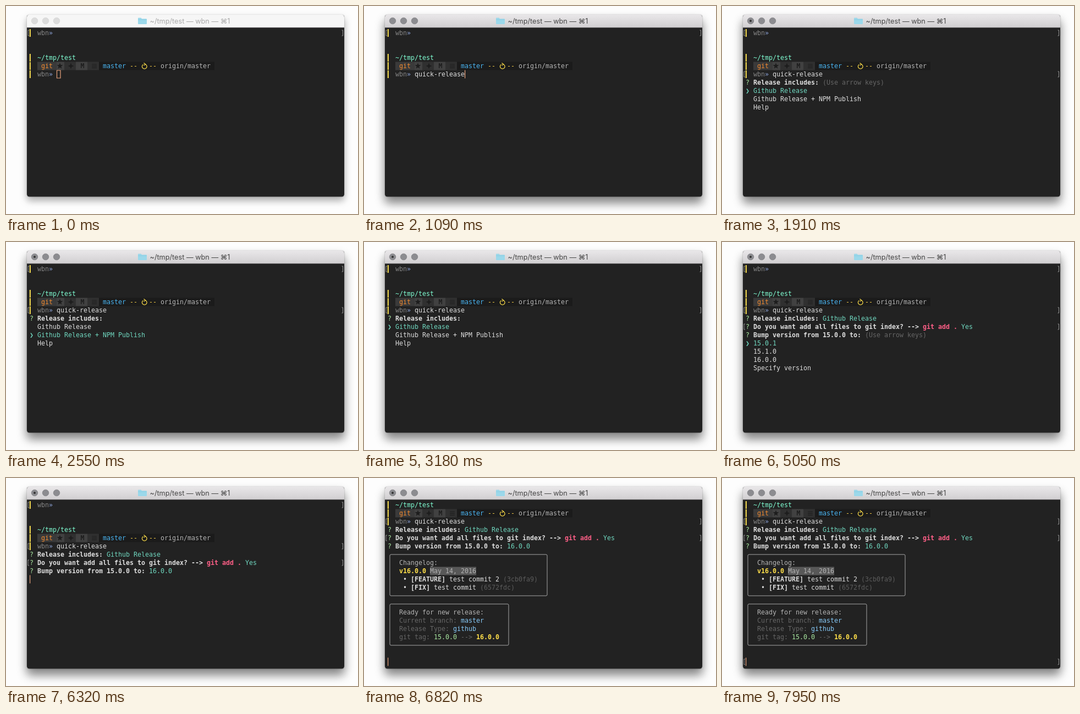
An HTML page that plays this animation: 640 px wide and 378 px high, repeating every 8000 ms.

```html
<!DOCTYPE html>
<html lang="en">
<head>
<meta charset="utf-8">
<title>Terminal</title>
<style>
  html, body { margin: 0; width: 100%; height: 100%; overflow: hidden; background: #fdfdfd; }
  svg { display: block; width: 100vw; height: 100vh; }
  #screen text { font: 11.63px "DejaVu Sans Mono", monospace; white-space: pre; }
  #screen .b { font-weight: bold; }
  #title { font: 12.7px Inter, "DejaVu Sans", sans-serif; text-anchor: middle; }
  .active #frame { filter: drop-shadow(0 11px 9px rgba(0, 0, 0, .42)) drop-shadow(0 0 1px rgba(0, 0, 0, .3)); }
  .idle #frame { filter: drop-shadow(0 7px 7px rgba(0, 0, 0, .28)) drop-shadow(0 0 1px rgba(0, 0, 0, .25)); }
  .active #bar { fill: url(#chrome); }
  .idle #bar { fill: #f6f6f6; }
  .active #lights { fill: #8c8c90; stroke: #77777b; }
  .idle #lights { fill: #dcdcdc; stroke: #d0d0d0; }
  .active #title { fill: #464646; }
  .idle #title { fill: #a9a9a9; }
</style>
</head>
<body>
<svg id="stage" class="idle" viewBox="0 0 640 378">
  <defs>
    <linearGradient id="chrome" x2="0" y2="1">
      <stop stop-color="#e9e7e9"/><stop offset="1" stop-color="#d1cfd1"/>
    </linearGradient>
    <clipPath id="view"><rect x="38" y="40" width="577" height="306"/></clipPath>
  </defs>
  <rect id="frame" x="38" y="16" width="577" height="330.5" rx="4.5" fill="#222"/>
  <path id="bar" d="M38 39V20.5a5 5 0 0 1 5-5H610a5 5 0 0 1 5 5V39z"/>
  <path d="M38 39H615" stroke="#aaa8aa" stroke-width=".8"/>
  <g id="lights" stroke-width=".6">
    <circle cx="52" cy="27" r="5.8"/><circle cx="72" cy="27" r="5.8"/><circle cx="92" cy="27" r="5.8"/>
  </g>
  <circle id="dot" cx="52" cy="27" r="2" fill="#333"/>
  <path d="M240 22.5q0-1 1-1h4.5l1.5 1.7h8q1 0 1 1V32q0 1-1 1H241q-1 0-1-1z" fill="#9bd8ea"/>
  <path d="M240 25H256" stroke="#83c7dd" stroke-width=".7"/>
  <text id="title" x="334.5" y="32">~/tmp/test — wbn — ⌘1</text>
  <g clip-path="url(#view)"><g id="screen"></g></g>
</svg>
<script>
const LOOP = 8000, CELL = 7, LINE = 15, LEFT = 43, TOP = 49;
const COMMAND = "quick-release", USER = "wbn";
const $ = id => document.getElementById(id);

const color = {
  gray: "#858585", dim: "#666", faint: "#5c5c5c", soft: "#b4b4b4", white: "#dedede",
  teal: "#70d8c0", mint: "#80ffd4", green: "#a9e8a0", blue: "#86c9f7", sky: "#4ab5f2",
  yellow: "#ffe04a", gold: "#eec544", orange: "#f08a30", pink: "#ff5f87", arrow: "#8fa6dc",
  cursor: "#eaa27c"
};

// Times of the key presses and of the output that follows them
const at = {
  focus: 340, type: 560, typed: 1040, run: 1240, menu: 1580,
  picked: 3230, ask: 3310, yes: 4300, bump: 4400,
  chosen: 6060, report: 6500, confirm: 7600
};
const releaseMoves = [[2180, 1], [2620, 2], [2860, 1], [3060, 0]];
const bumpMoves = [[5330, 1], [5640, 2]];

const colX = c => LEFT + c * CELL;
const rowY = r => TOP + r * LINE;
const esc = s => s.replace(/&/g, "&amp;").replace(/</g, "&lt;").replace(/>/g, "&gt;");

const rect = (x, y, w, h, fill) =>
  `<rect x="${x}" y="${y}" width="${w}" height="${h}" fill="${fill}"/>`;
const path = (d, stroke, width = 1) =>
  `<path d="${d}" fill="none" stroke="${stroke}" stroke-width="${width}"/>`;

// Spans are [text, colour name, bold], laid out on the character grid
function write(row, col, ...spans) {
  let out = "";
  for (const [text, name, bold] of spans) {
    out += `<text x="${colX(col)}" y="${rowY(row) + 4}" fill="${color[name]}"` +
      `${bold ? ' class="b"' : ""}>${esc(text)}</text>`;
    col += text.length;
  }
  return out;
}

const block = (row, col, cells, fill) => rect(colX(col), rowY(row) - 7.5, cells * CELL, LINE, fill);
const gutter = row => rect(42.8, rowY(row) - 7, 2.1, 14, "#f5dc50");
const caret = (row, col) => rect(colX(col), rowY(row) - 7.5, 1.2, 15, color.cursor);

function mark(row) {
  const y = rowY(row) - 5;
  return path(`M42 ${y}h-2v10h2M610.5 ${y}h2v10h-2`, "#a0a0a0", .9);
}

function prompt(row, command = "") {
  return gutter(row) + write(row, 2, [USER, "gray"], ["» ", "arrow"], [command, "white"]);
}

function star(cx, cy, points, outer, inner) {
  const pts = Array.from({ length: points * 2 }, (_, i) => {
    const a = i * Math.PI / points - Math.PI / 2, r = i % 2 ? inner : outer;
    return `${(cx + r * Math.cos(a)).toFixed(1)},${(cy + r * Math.sin(a)).toFixed(1)}`;
  });
  return `<polygon points="${pts.join(" ")}" fill="#1d1d1d"/>`;
}

function gitLine(row) {
  const y = rowY(row);
  return gutter(row) +
    block(row, 2, 5, "#3a3a3a") + block(row, 7, 2, "#414141") + block(row, 9, 3, "#303030") +
    block(row, 12, 3, "#414141") + block(row, 15, 3, "#303030") + block(row, 18, 30, "#1b1b1b") +
    write(row, 3, ["git", "orange"]) +
    star(98, y, 5, 5.8, 2.4) + star(118, y, 4, 5.5, 2.2) +
    `<text x="135.5" y="${y + 4}" class="b" fill="#1d1d1d">M</text>` +
    path(`M156 ${y - 3}h9m-9 3.2h9m-9 3.2h9`, "#1d1d1d", 1.2) +
    write(row, 19, ["master", "sky"], [" --", "gold"]) +
    path(`M249.5 ${y - 2.8}a4.3 4.3 0 1 0 4.5 0M250.5 ${y - 5.5}l3.2 2.5l-3.2 2`, color.yellow, 1.2) +
    write(row, 31, ["-- ", "gold"], ["origin/master", "soft"]);
}

const question = (row, text, ...answer) =>
  write(row, 0, ["? ", "green"], [text + " ", "white", true], ...answer);

const list = (row, items, pick) => items.map((item, i) =>
  (i === pick ? write(row + i, 0, ["❯", "teal"]) : "") +
  write(row + i, 2, [item, i === pick ? "teal" : "white"])).join("");

function menu(row, text, items, moves, t) {
  const done = moves.filter(([time]) => t >= time);
  const pick = done.length ? done[done.length - 1][1] : 0;
  const hint = done.length ? "" : "(Use arrow keys)";
  return question(row, text, [hint, "dim"]) + list(row + 1, items, pick);
}

function box(row, rows, lastCol) {
  const x = 47, y = rowY(row), w = colX(lastCol) + 3 - x, h = (rows - 1) * LINE;
  return `<rect x="${x}" y="${y}" width="${w}" height="${h}" rx="2" fill="none" stroke="#a6a6a6"/>`;
}

function report() {
  return box(9, 6, 41) +
    write(10, 3, ["Changelog:", "soft"]) +
    block(11, 11, 12, "#585858") +
    write(11, 3, ["v16.0.0", "yellow", true], [" May 14, 2016", "soft"]) +
    write(12, 4, ["• ", "white"], ["[FEATURE]", "white", true], [" test commit 2 ", "white"], ["(3cb0fa9)", "faint"]) +
    write(13, 4, ["• ", "white"], ["[FIX]", "white", true], [" test commit ", "white"], ["(6572fdc)", "faint"]) +
    box(15, 6, 31) +
    write(16, 3, ["Ready for new release:", "soft"]) +
    write(17, 3, ["Current branch: ", "dim"], ["master", "blue"]) +
    write(18, 3, ["Release Type: ", "dim"], ["github", "blue"]) +
    write(19, 3, ["git tag: ", "dim"], ["15.0.0", "green"], [" --> ", "dim"], ["16.0.0", "yellow", true]);
}

function screen(t) {
  const share = (t - at.type) / (at.typed - at.type);
  const typed = Math.max(0, Math.min(COMMAND.length, Math.ceil(share * COMMAND.length)));
  let out = mark(0) + prompt(0) +
    gutter(3) + write(3, 2, ["~/tmp/test", "mint"]) +
    gitLine(4) + prompt(5, COMMAND.slice(0, typed));

  if (t < at.focus) {
    const y = rowY(5) - 7;
    return out + path(`M92.5 ${y}h6.5v14h-6.5z`, color.cursor, 1.2);
  }
  if (t < at.run) return out + caret(5, 7 + typed);
  out += mark(5);
  if (t < at.menu) return out + caret(6, 0);

  if (t < at.picked) {
    return out + menu(6, "Release includes:",
      ["Github Release", "Github Release + NPM Publish", "Help"], releaseMoves, t);
  }
  out += question(6, "Release includes:", ["Github Release", "teal"]);
  if (t < at.ask) return out + caret(7, 0);

  const said = t >= at.yes;
  out += question(7, "Do you want add all files to git index? -->",
    ["git add . ", "pink", true], said ? ["Yes", "teal"] : ["(Y/n) ", "dim"]);
  if (!said) return out + caret(7, 62);
  out += mark(7);
  if (t < at.bump) return out + caret(8, 0);

  if (t < at.chosen) {
    return out + menu(8, "Bump version from 15.0.0 to:",
      ["15.0.1", "15.1.0", "16.0.0", "Specify version"], bumpMoves, t);
  }
  out += question(8, "Bump version from 15.0.0 to:", ["16.0.0", "teal"]);
  if (t < at.report) return out + caret(9, 0);
  return out + report() + caret(22, 0) + (t >= at.confirm ? mark(22) : "");
}

let shown = "";
function draw(t) {
  $("stage").setAttribute("class", t < at.focus ? "idle" : "active");
  $("dot").style.display = t >= at.run && t < at.confirm ? "" : "none";
  $("screen").setAttribute("transform", `translate(0 ${t < at.report ? 0 : -3 * LINE})`);
  const next = screen(t);
  if (next !== shown) $("screen").innerHTML = shown = next;
}

const start = performance.now();
function tick() {
  draw((performance.now() - start) % LOOP);
  requestAnimationFrame(tick);
}
tick();
</script>
</body>
</html>
```
